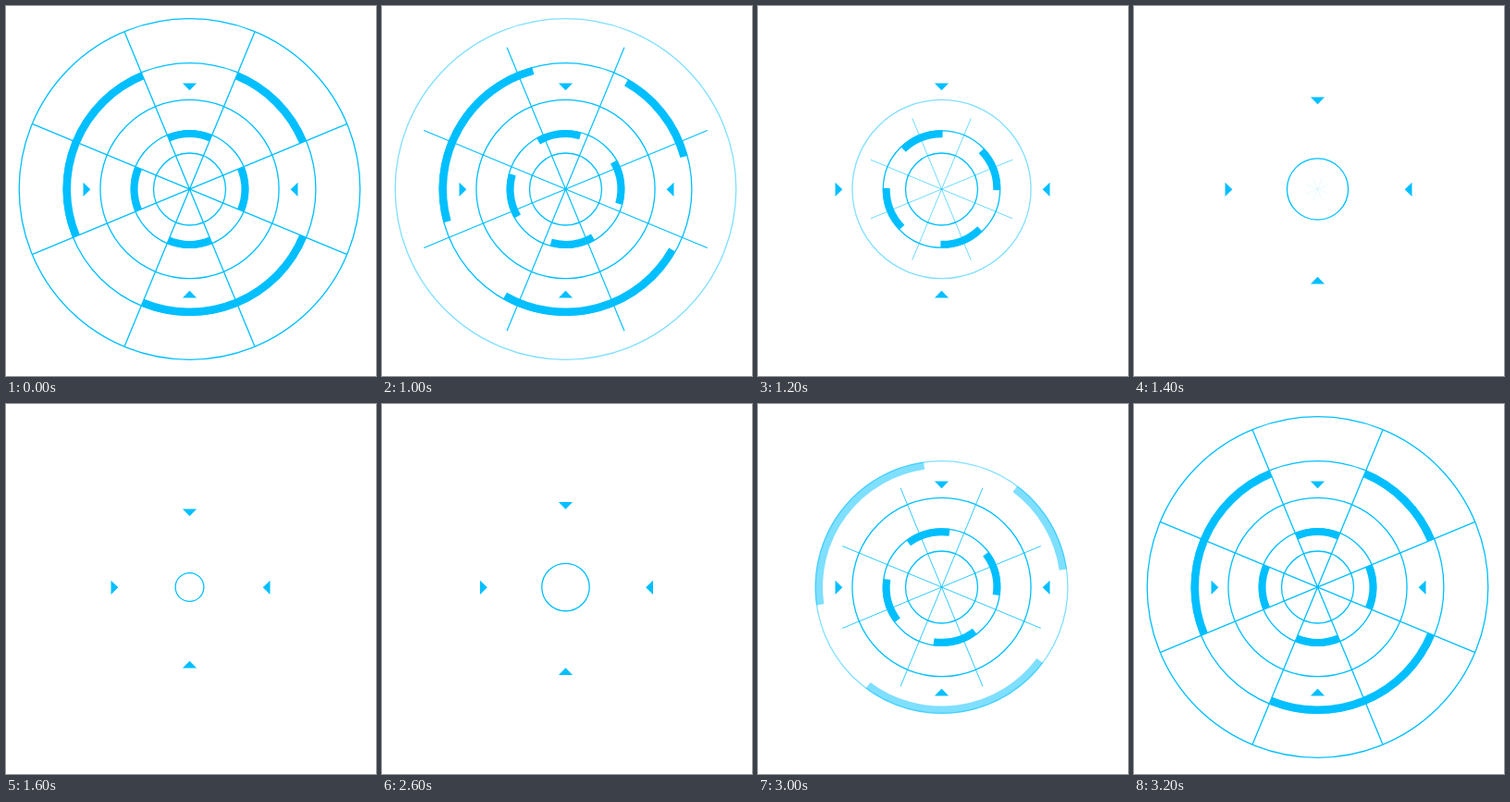
An HTML page with a canvas for the animation above (3.3 s loop, 400 by 400 pixels).

```html
<!DOCTYPE html>
<html lang="en">
<head>
<meta charset="utf-8">
<title>Radar dial</title>
<style>
html, body { margin: 0; width: 100%; height: 100%; overflow: hidden; background: #fff; }
canvas { display: block; width: 400px; height: 400px; }
</style>
</head>
<body>
<canvas id="stage" width="400" height="400"></canvas>
<script>
const ctx = document.getElementById('stage').getContext('2d');
const COLOR = '#00bfff';
const LINE = 1.3;
const LOOP = 3300;
const CX = 198.5, CY = 198;
const TURN = 7.15; // degrees per step
const SPOKE_SCALE = [1, 0.9, 0.63, 0.45, 0.26, 0.07, 0, 0];

const rad = deg => deg * Math.PI / 180;
const clamp = v => Math.min(1, Math.max(0, v));

// The dial folds in 100 ms steps, rests, then unfolds the same way.
function stepAt(t) {
  if (t < 1000) return 0;
  if (t < 1600) return 1 + Math.floor((t - 1000) / 100);
  if (t < 2600) return 7;
  return Math.max(0, 6 - Math.floor((t - 2600) / 100));
}

function arc(r, width, from = 0, to = 360) {
  ctx.lineWidth = width;
  ctx.beginPath();
  ctx.arc(CX, CY, r, rad(from), rad(to));
  ctx.stroke();
}

// Opaque before its step, half-faded on it, gone afterwards.
function fading(step, fadeStep, draw) {
  if (step > fadeStep) return;
  ctx.globalAlpha = step === fadeStep ? 0.5 : 1;
  draw();
  ctx.globalAlpha = 1;
}

function spokes(scale) {
  if (!scale) return;
  ctx.lineWidth = LINE * scale;
  ctx.beginPath();
  for (let i = 0; i < 4; i++) {
    const a = rad(22.5 + 45 * i);
    const x = 184.3 * scale * Math.cos(a), y = 184.3 * scale * Math.sin(a);
    ctx.moveTo(CX - x, CY - y);
    ctx.lineTo(CX + x, CY + y);
  }
  ctx.stroke();
}

function arrow(x, y, angle) {
  ctx.save();
  ctx.translate(x, y);
  ctx.rotate(rad(angle));
  ctx.beginPath();
  ctx.moveTo(0, -7.6);
  ctx.lineTo(7.8, 0);
  ctx.lineTo(0, 7.6);
  ctx.fill();
  ctx.restore();
}

function draw(step) {
  const turn = TURN * step;
  const p = clamp((step - 3) / 4);

  ctx.fillStyle = '#fff';
  ctx.fillRect(0, 0, 400, 400);
  ctx.fillStyle = ctx.strokeStyle = COLOR;

  spokes(SPOKE_SCALE[step]);
  fading(step, 1, () => arc(184.3, LINE));
  fading(step, 2, () => {
    arc(136.4, LINE);
    for (const [from, to] of [[157.5, 247.5], [-67.5, -22.5], [22.5, 112.5]])
      arc(132.7, 8.4, from + turn, to + turn);
  });
  fading(step, 3, () => arc(96.6, LINE));
  fading(step, 4, () => {
    arc(63.2, LINE);
    for (let a = 0; a < 360; a += 90)
      arc(59.8, 8, a - 22.5 - turn, a + 22.5 - turn);
  });
  arc(39 - 23.6 * p * p, LINE);

  const near = 83.5 + 30 * p, far = 315.5 - 30 * p;
  arrow(near, 198.3, 0);
  arrow(CX, near, 90);
  arrow(far, 198.3, 180);
  arrow(CX, far, 270);
}

const start = performance.now();
function frame() {
  draw(stepAt((performance.now() - start) % LOOP));
  requestAnimationFrame(frame);
}
frame();
</script>
</body>
</html>
```
